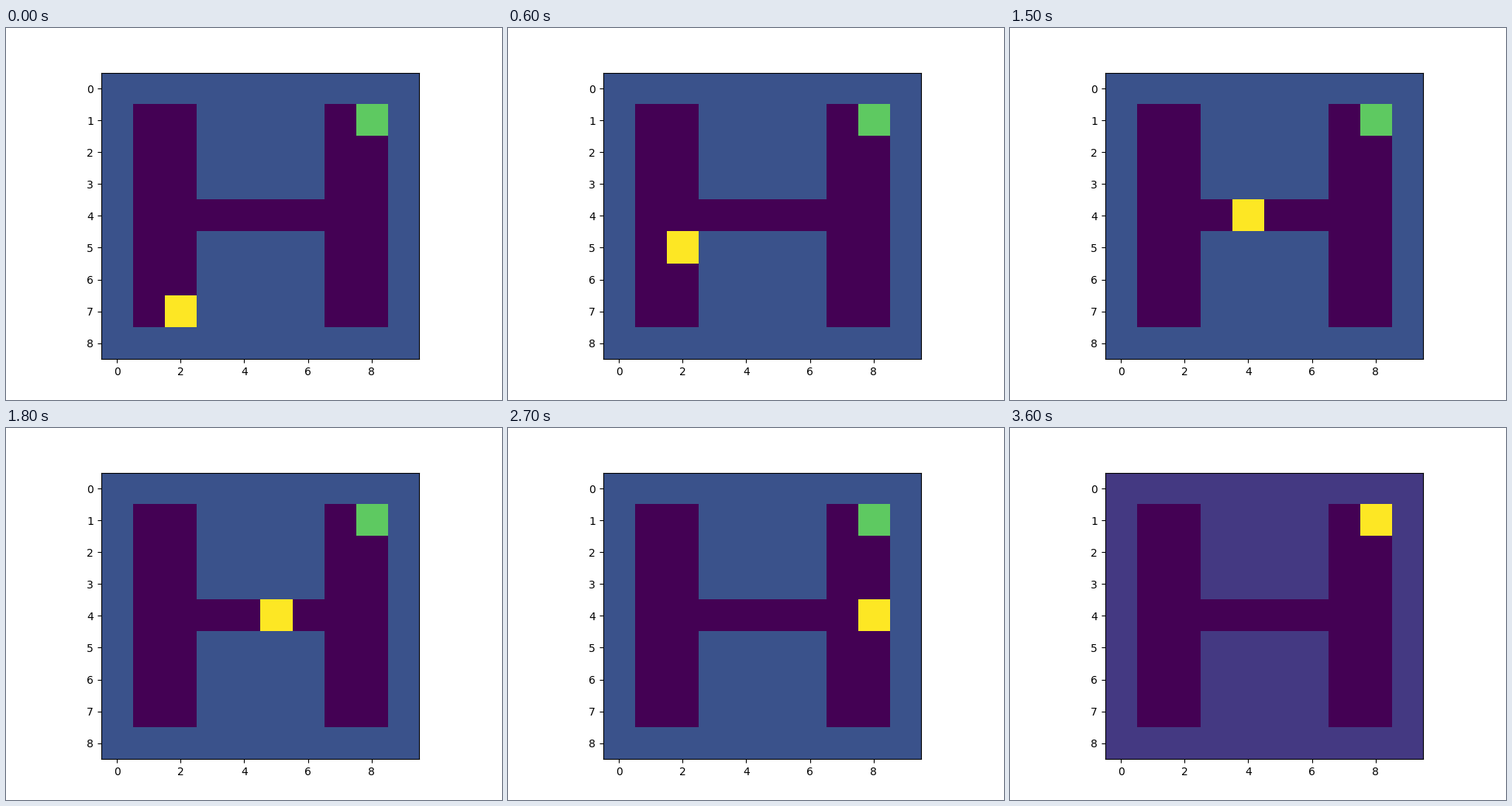
Write a matplotlib script that moves like this. It is 640 px wide and 480 px high and loops after 3.9 s.

```python
import numpy as np
import matplotlib.pyplot as plt
from matplotlib.animation import FuncAnimation

WALL, GOAL, AGENT, REACHED = 1, 3, 4, 6
STEP_MS = 300

# H-shaped room: two halls joined by a corridor, cells as (row, column)
room = np.full((9, 10), WALL)
room[1:8, 1:3] = 0
room[1:8, 7:9] = 0
room[4, 3:7] = 0

goal = (1, 8)
path = (
    [(row, 2) for row in range(7, 4, -1)]
    + [(4, col) for col in range(2, 8)]
    + [(row, 8) for row in range(4, 0, -1)]
)


def grid_at(step):
    grid = room.copy()
    grid[goal] = GOAL
    cell = path[step]
    grid[cell] = REACHED if cell == goal else AGENT
    return grid


fig, ax = plt.subplots(figsize=(6.4, 4.8), dpi=100)
image = ax.imshow(grid_at(0), cmap="viridis")


def update(step):
    grid = grid_at(step)
    image.set_data(grid)
    image.set_clim(0, grid.max())  # the colour scale follows the highest value
    return (image,)


anim = FuncAnimation(fig, update, frames=len(path), interval=STEP_MS,
                     repeat=True, repeat_delay=0, blit=False)
plt.show()
```
